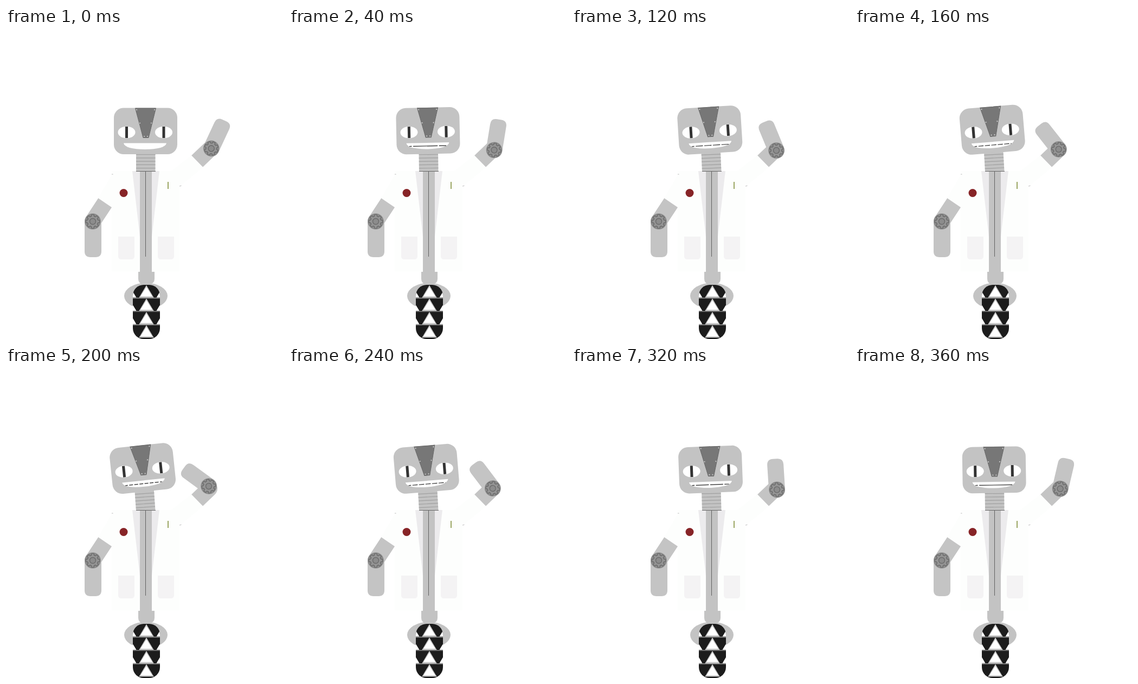
These frames come from a looping animation (511 px wide and 574 px high, 400 ms). An HTML page:

```html
<!DOCTYPE html>
<html lang="en">
<head>
<meta charset="utf-8">
<title>Waving robot</title>
<style>
  html, body { margin: 0; width: 100%; height: 100%; overflow: hidden; background: #fff; }
  svg { display: block; width: 511px; height: 574px; }
</style>
</head>
<body>
<svg viewBox="0 0 511 574" xmlns="http://www.w3.org/2000/svg">
  <defs>
    <clipPath id="tyre"><rect x="234" y="474" width="50" height="100" rx="20"/></clipPath>
    <clipPath id="eye"><ellipse rx="16" ry="10.8"/></clipPath>
    <g id="eyeball">
      <ellipse rx="16" ry="10.8" fill="#fff"/>
      <rect x="-2.5" y="-10.5" width="5" height="21" fill="#333" clip-path="url(#eye)"/>
    </g>
    <g id="gear">
      <circle r="14.8" fill="#8c8c8c"/>
      <path id="teeth" fill="#949494" stroke="#6c6c6c" stroke-width="1.4" stroke-linejoin="round"/>
      <circle r="5.5" fill="#8c8c8c" stroke="#6c6c6c" stroke-width="1.4"/>
    </g>
  </defs>

  <g id="neck">
    <rect x="240" y="225" width="35.5" height="45" fill="#c3c3c3"/>
    <path id="rings" stroke="#a0a0a0" stroke-width="1.2"/>
  </g>

  <!-- arms -->
  <path d="M160 357L183 322M375 224.500L352.500 246" stroke="#c4c4c4" stroke-width="30" stroke-linecap="round"/>
  <path d="M145 357h31v55q0 11-11 11h-9q-11 0-11-11z" fill="#c4c4c4"/>
  <use href="#gear" x="160" y="357"/>
  <g id="forearm">
    <path d="M-15 0V-46Q-15-57-4-57H4Q15-57 15-46V0A15 15 0 0 1-15 0z" fill="#c4c4c4"/>
    <use href="#gear"/>
  </g>

  <!-- coat -->
  <path d="M195 264H305L342 235 363.500 257 320 293V449H195V331L170 314 195 271z" fill="#fdfefd"/>
  <path d="M195 270h2.500M320 292l3.500-1" stroke="#bbb"/>
  <path d="M233 264H283L269 385H247z" fill="#ecebed"/>
  <path id="pocket" d="M207 385h30v36q0 6-6 6h-18q-6 0-6-6z" fill="#f4f3f4"/>
  <use href="#pocket" x="73"/>
  <circle cx="217" cy="304.500" r="7.500" fill="#872427"/>
  <rect x="298" y="284" width="2" height="13" fill="#9aa662"/>

  <!-- spine and wheel -->
  <rect x="247" y="264" width="22" height="187" fill="#c3c3c3"/>
  <path d="M240 264.500H276" stroke="#666"/>
  <path d="M257.500 265V422" stroke="#606060"/>
  <ellipse cx="258" cy="494.500" rx="40" ry="24" fill="#c3c3c3"/>
  <path d="M244 450h30v13q0 9-9 9h-12q-9 0-9-9z" fill="#c3c3c3"/>
  <g id="wheel" clip-path="url(#tyre)"></g>

  <g id="head">
    <rect x="199" y="147.500" width="117" height="85.500" rx="18" fill="#c3c3c3"/>
    <path d="M238.500 148H276.500L263 202.500H253z" fill="#777" stroke="#696969"/>
    <g id="rivets" fill="#ccc"></g>
    <use href="#eyeball" x="222.500" y="192.500"/>
    <use href="#eyeball" x="291" y="192.500"/>
    <path d="M217 212.500H296Q295 218 285 221 273 224 257 224 240 224 228 221 218 218 217 212.500z" fill="#fff"/>
    <path id="teethline" d="M222.500 218.400H290.500" stroke="#222" stroke-width="1.100"/>
  </g>
</svg>
<script>
const $ = id => document.getElementById(id);
const set = (id, name, value) => $(id).setAttribute(name, value);

function gearPath(n) {
  let d = "";
  for (let i = 0; i < n; i++) {
    for (const [turn, r] of [[-.32, 9.8], [-.22, 12.8], [.22, 12.8], [.32, 9.8]]) {
      const a = (i + turn) / n * Math.PI * 2;
      d += (d ? "L" : "M") + (r * Math.sin(a)).toFixed(2) + " " + (-r * Math.cos(a)).toFixed(2);
    }
  }
  return d + "z";
}

function wheel() {
  let out = '<rect x="234" y="474" width="50" height="100" fill="#1c1c1c"/>';
  for (let i = 0; i < 4; i++) {
    const top = 475 + i * 24.6, base = top + 22.5;
    for (const x of [227, 259, 291]) {
      out += `<path d="M${x} ${top}L${x + 13.5} ${base}H${x - 13.5}z" fill="#fff"/>`;
    }
    out += `<path d="M259 ${top + 2}L271 ${base - 1.5}H247z" fill="none" stroke="#777" stroke-width=".6"/>`;
    if (i < 3) out += `<path d="M234 ${base + 1}H284" stroke="#999" stroke-width="1.4"/>`;
  }
  return out;
}

set("teeth", "d", gearPath(8));
$("wheel").innerHTML = wheel();
$("rivets").innerHTML = [[241, 151], [274, 151], [247, 175.5], [268, 175.5], [255, 200], [261, 200]]
  .map(([x, y]) => `<circle cx="${x}" cy="${y}" r="1.1"/>`).join("");
set("rings", "d", [0, 1, 2, 3, 4].map(i => `M240 ${233.5 + i * 6.3}h35.5`).join(""));

const STEP = 40, STEPS = 10;

// s is 0 with the arm out and 1 with the arm fully bent
function pose(s) {
  const x = 378.7 - 4.7 * s * s;
  const y = 222.3 + 18.9 * s - 21.2 * s * s;
  set("forearm", "transform", `translate(${x} ${y}) rotate(${25 - 79 * s})`);

  const tilt = 6 * s;
  set("head", "transform", `translate(${-5.1 * s} ${-3 * s}) rotate(${-tilt} 256.75 192.5)`);
  set("neck", "transform", `rotate(${-4 * s} 258 265)`);

  // the thin line between the teeth breaks up as it tilts
  set("teethline", "visibility", s ? "visible" : "hidden");
  if (s) {
    const run = 1 / Math.tan(tilt * Math.PI / 180);
    set("teethline", "stroke-dasharray", `${run - 2.5} 2.5`);
    set("teethline", "stroke-dashoffset", run - 7);
  }
}

function draw(now) {
  const k = Math.floor(now / STEP) % STEPS;
  pose(k <= 5 ? k / 5 : 1 - (k - 5) * .2125);
}

let start;
function tick(now) {
  start ??= now;
  draw(now - start);
  requestAnimationFrame(tick);
}
draw(0);
requestAnimationFrame(tick);
</script>
</body>
</html>
```
